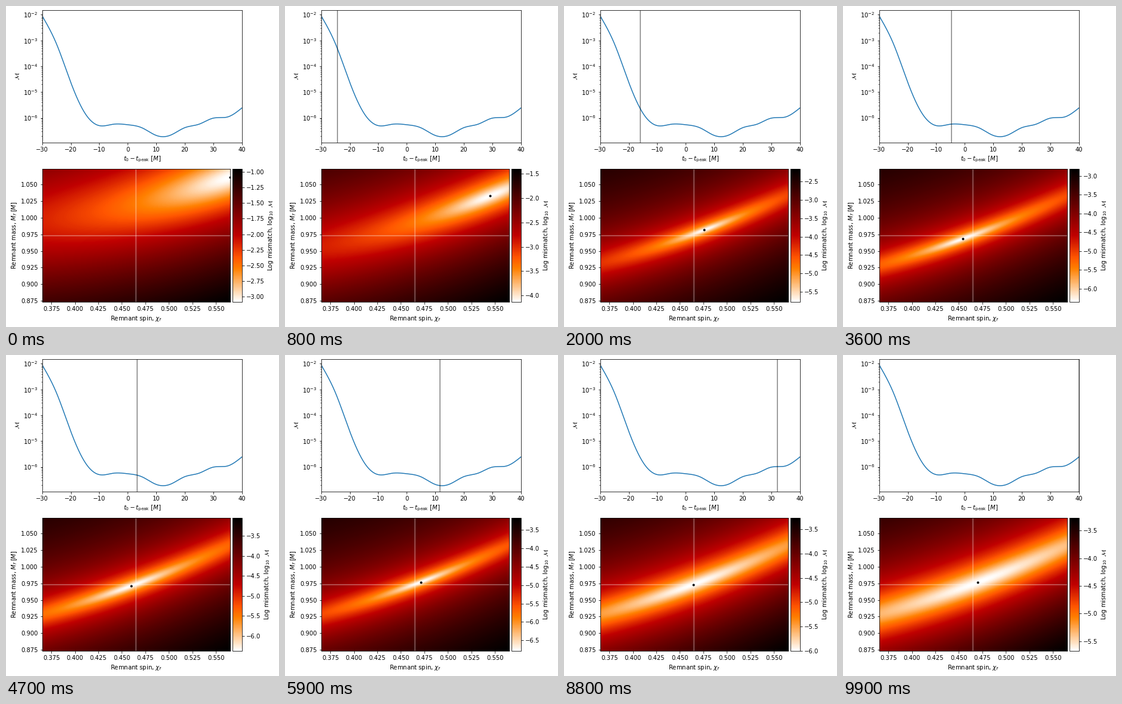
These frames come from a looping animation (458x538 px, 10000 ms). A matplotlib script:

```python
import numpy as np
import matplotlib.pyplot as plt
from matplotlib.animation import FuncAnimation
from mpl_toolkits.axes_grid1 import make_axes_locatable

W, H, DPI = 458, 538, 72
FRAMES, INTERVAL = 100, 100
SPIN, MASS, HALF = 0.4652, 0.9734, 0.1
START, END, STEP = -30, 40, 5

# log10 mismatch at every STEP from START to END
KNOTS = np.array([-2.05, -3.13, -4.62, -5.82, -6.3, -6.245, -6.265, -6.385,
                  -6.68, -6.67, -6.38, -6.245, -6.01, -5.965, -5.62])


def knot_slopes(v):
    """Slopes of the natural cubic spline through evenly spaced values."""
    n = len(v)
    m = 4 * np.eye(n) + np.eye(n, k=1) + np.eye(n, k=-1)
    m[0, 0] = m[-1, -1] = 2
    p = np.pad(v, 1, mode="edge")
    return np.linalg.solve(m, 3 * (p[2:] - p[:-2]))


SLOPES = knot_slopes(KNOTS)


def curve(t):
    x = (np.asarray(t) - START) / STEP
    i = np.clip(x.astype(int), 0, len(KNOTS) - 2)
    s = x - i
    a, b = s**2 * (3 - 2 * s), s * (1 - s)
    return ((1 - a) * KNOTS[i] + a * KNOTS[i + 1]
            + b * (1 - s) * SLOPES[i] - b * s * SLOPES[i + 1])


spin = np.linspace(SPIN - HALF, SPIN + HALF, 316)
mass = np.linspace(MASS - HALF, MASS + HALF, 223)[:, None]


def state(t):
    """Mismatch map, colour limits and best point at start time t."""
    x = t - START
    fade = np.exp(-(x / 17.8)**1.35)
    lift = fade**4.2

    # the best spin leaves the edge, then sways about the true value
    sway = 0.009 * np.cos(2 * np.pi * (x - 41) / 27) - 0.003
    shift = min(HALF, 0.15 * np.exp(-(x / 7.59)**2) + sway)
    best = SPIN + shift
    lo = curve(t) - 10.3 * abs(shift)
    hi = -3.28 + 2.32 * fade

    def valley(c):
        u = (c - SPIN) / HALF
        return (0.974 + 0.048 * lift + (0.052 - 0.0195 * lift) * u
                + 0.007 * u**2)

    s = np.abs(spin - best)
    grow = 10**(-3.4 + 2.96 * fade**1.2)
    floor = 10**lo + grow * s**2 / (1 + 7 * s)
    d = mass - valley(spin)
    wall = d**2 * np.exp(-2 * d)
    scale = (10**hi - floor[-1]) / wall[0, -1]
    return np.log10(floor + scale * wall), lo, hi, best, valley(best)


def box(x, y, w, h):
    return [x / W, 1 - (y + h) / H, w / W, h / H]


plt.rcParams.update({"font.family": "DejaVu Sans", "font.size": 10})
fig = plt.figure(figsize=(W / DPI, H / DPI), dpi=DPI)
top = fig.add_axes(box(60.75, 6.62, 334.8, 222.38))
low = fig.add_axes(box(60.75, 273.46, 334.8, 222.38))
times = np.linspace(START, END, FRAMES)

fine = np.linspace(START, END, 701)
top.semilogy(fine, 10**curve(fine))
top.set_xlim(START, END)
top.set_ylim(10**-6.959, 10**-1.818)
top.set_xlabel(r"$t_0 - t_\mathrm{peak}\ [M]$")
top.set_ylabel(r"$\mathcal{M}$")
cursor = top.axvline(START, color="k", alpha=0.5)

extent = [SPIN - HALF, SPIN + HALF, MASS - HALF, MASS + HALF]
image = low.imshow(state(START)[0], extent=extent, origin="lower",
                   aspect="auto", cmap="gist_heat_r")
low.axvline(SPIN, color="w", alpha=0.4)
low.axhline(MASS, color="w", alpha=0.4)
dot, = low.plot([], [], "k.")
low.set_xlim(extent[:2])
low.set_ylim(extent[2:])
low.set_xlabel(r"Remnant spin, $\chi_f$")
low.set_ylabel(r"Remnant mass, $M_f\ [M]$")

cax = make_axes_locatable(low).append_axes("right", size="5%", pad=0.05)
fig.colorbar(image, cax=cax, label=r"Log mismatch, $\log_{10}\ \mathcal{M}$")


def update(i):
    field, lo, hi, x, y = state(times[i])
    cursor.set_xdata([times[i]] * 2)
    image.set_data(field)
    image.set_clim(lo, hi)
    dot.set_data([x], [y])
    return cursor, image, dot


anim = FuncAnimation(fig, update, frames=FRAMES, interval=INTERVAL,
                     repeat=True, repeat_delay=0)
plt.show()
```
